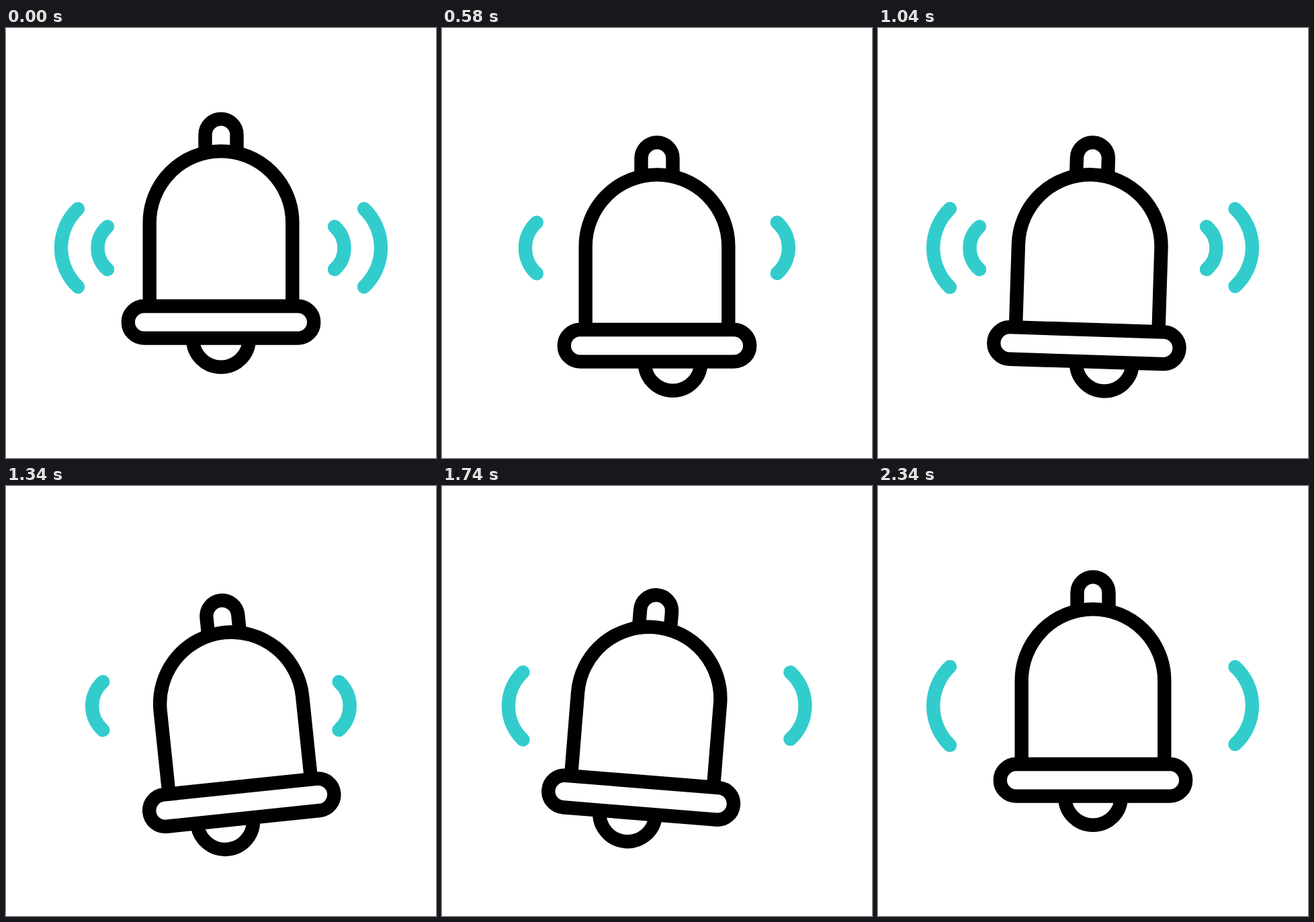
Write an HTML page that moves like this. It is 640x640 px and loops after 2400 ms.

```html
<!DOCTYPE html>
<html lang="en">
<head>
<meta charset="utf-8">
<title>Ringing bell</title>
<style>
  html, body { margin: 0; width: 100%; height: 100%; overflow: hidden; background: #fff; }
  svg { display: block; width: 100%; height: 100%; }
  path, rect { fill: none; stroke: #000; stroke-width: 20.4; }
  .brim { fill: #fff; }
  .wave { stroke: #3cc; stroke-linecap: round; }
</style>
</head>
<body>
<svg viewBox="0 0 640 640">
  <g id="bell">
    <path id="clapper" d="M278.2 463a41.8 41.8 0 0 0 83.6 0"/>
    <path d="M296.5 184V158.9a23.5 23.5 0 0 1 47 0V184"/>
    <path d="M213.7 414V289.6a106.3 106.3 0 0 1 212.6 0V414"/>
    <rect class="brim" x="181.8" y="414" width="276.4" height="47.6" rx="23.7"/>
  </g>
  <path class="wave" id="near"/>
  <path class="wave" id="far"/>
</svg>
<script>
const LOOP = 2400, STEP = 20, LAST = 2340, WAVE = 260;
const [bell, clapper, near, far] = ['bell', 'clapper', 'near', 'far'].map(id => document.getElementById(id));

// Keys are [ms, value]
const drop = [[0, 0], [260, 35], [1560, 35], [2100, 0]];
const swing = [[0, 0], [260, 6], [480, -6], [680, 6], [910, -6], [1130, 6], [1350, -6], [1560, 6], [2100, 0]];
const knock = [[0, 0], [204, 34], [420, -34], [640, 34], [870, -34], [1088, 34], [1292, -34], [1512, 34], [1740, -18], [2100, 0]];

// cubic-bezier(.42, 0, .58, 1)
function ease(x) {
  let lo = 0, hi = 1;
  for (let i = 0; i < 24; i++) {
    const u = (lo + hi) / 2, v = 1 - u;
    if (1.26 * u * v * v + 1.74 * u * u * v + u * u * u < x) lo = u; else hi = u;
  }
  return lo * lo * (3 - 2 * lo);
}

function at(keys, t) {
  const i = keys.findIndex(k => k[0] > t);
  if (i < 0) return keys[keys.length - 1][1];
  const [t0, a] = keys[i - 1], [t1, b] = keys[i];
  return a + (b - a) * ease((t - t0) / (t1 - t0));
}

const mix = (a, b, p) => a + (b - a) * p;

// Arc through two tips and its outermost point; dir is -1 left, 1 right
function arc(dir, tip, edge, half, y) {
  const sag = edge - tip, r = (half * half + sag * sag) / (2 * sag), x = 320 + dir * tip;
  return `M${x} ${y - half}A${r} ${r} 0 0 ${dir > 0 ? 1 : 0} ${x} ${y + half}`;
}

function waves(p) {
  return arc(-1, mix(169, 213, p), mix(183.5, 237.8, p), mix(31.8, 58.4, p), 327.4) +
         arc(1, mix(169, 211.5, p), mix(183.5, 237, p), mix(31.8, 57.6, p), mix(327.4, 326.8, p));
}

const rest = arc(-1, 213, 238, 58, 327.2) + arc(1, 213, 238, 58, 327.2);

function draw(now) {
  const t = Math.min(Math.floor(now % LOOP / STEP) * STEP, LAST);
  bell.setAttribute('transform', `translate(0 ${at(drop, t)}) rotate(${at(swing, t)} 320 141)`);
  clapper.setAttribute('transform', `translate(${at(knock, t)} 0)`);
  const phase = t % WAVE;
  near.setAttribute('d', t < LAST ? waves(phase / WAVE) : '');
  far.setAttribute('d', phase ? '' : t ? waves(1) : rest);
}

const start = performance.now();
function tick() {
  draw(performance.now() - start);
  requestAnimationFrame(tick);
}
tick();
</script>
</body>
</html>
```
